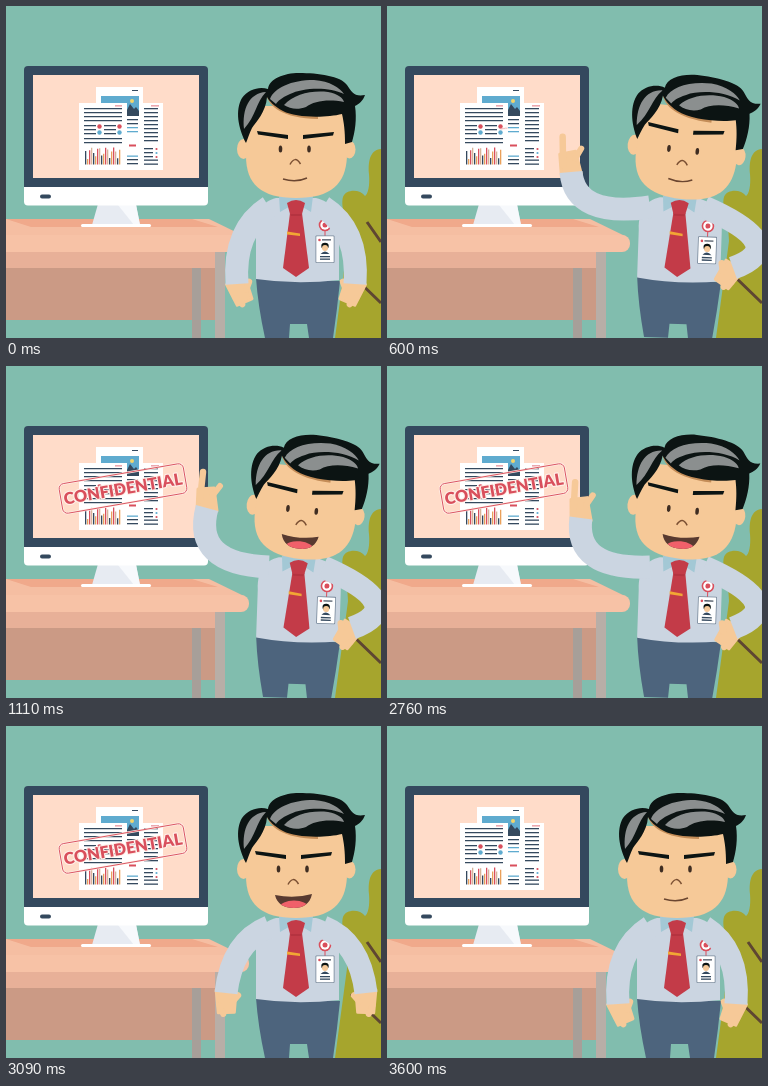
An HTML page with a canvas for the animation above (4500 ms loop, 375 by 332 pixels).

```html
<!DOCTYPE html>
<html lang="en">
<head>
<meta charset="utf-8">
<title>Confidential</title>
<style>
html, body { margin: 0; width: 100%; height: 100%; overflow: hidden; background: #81bdae; }
canvas { display: block; }
</style>
</head>
<body>
<canvas id="stage" width="375" height="332"></canvas>
<script>
const ctx = document.getElementById('stage').getContext('2d');
const LOOP = 4500;
const NAVY = '#34495e', RED = '#d94f5c', BLUE = '#5fabcf', SKIN = '#f6c998';
const SHIRT = '#cbd5e1', HAIR = '#0c1413', GRAY = '#8b8f8f', WHITE = '#ffffff';

// Drawing helpers
function fill(color, d) { ctx.fillStyle = color; ctx.fill(new Path2D(d)); }
function line(color, width, d) {
  ctx.strokeStyle = color;
  ctx.lineWidth = width;
  ctx.stroke(new Path2D(d));
}
function rect(color, x, y, w, h, r = 0) {
  ctx.fillStyle = color;
  ctx.beginPath();
  ctx.roundRect(x, y, w, h, r);
  ctx.fill();
}
function oval(color, x, y, rx, ry = rx) {
  ctx.fillStyle = color;
  ctx.beginPath();
  ctx.ellipse(x, y, rx, ry, 0, 0, Math.PI * 2);
  ctx.fill();
}
function rows(color, x, y, w, count = 1, gap = 4, h = 1.3) {
  for (let i = 0; i < count; i++) rect(color, x, y + i * gap, w, h);
}
function group(draw) { ctx.save(); draw(); ctx.restore(); }
function turn(degrees, x, y) {
  ctx.translate(x, y);
  ctx.rotate(degrees * Math.PI / 180);
  ctx.translate(-x, -y);
}

// Eased value between timed keys; values may be nested lists
const mix = (a, b, k) => Array.isArray(a) ? a.map((v, i) => mix(v, b[i], k)) : a + (b - a) * k;
function track(keys, t) {
  const next = keys.findIndex(([time]) => time > t);
  if (next === 0) return keys[0][1];
  if (next < 0) return keys[keys.length - 1][1];
  const [t0, a] = keys[next - 1], [t1, b] = keys[next];
  const k = (t - t0) / (t1 - t0);
  return mix(a, b, k * k * (3 - 2 * k));
}

// Arm pose: elbow control point, wrist, hand angle, finger extension
const hang = [[227, 224], [231, 278], -200, 0];
const swing = [[226, 216], [220, 267], -178, 0];
const reach = [[188, 212], [184, 166], -7, 1];
const point = [[186, 198], [201, 142], 0, 1];
const hip = [[174, 240], [234, 262], -212, 0];

const pointingArm = [[330, hang], [600, reach], [870, point], [2730, point], [2800, reach], [3090, swing], [3600, hang]];
const hipArm = [[330, hang], [600, hip], [2730, hip], [3090, swing], [3600, hang]];
const lean = [[330, 0], [600, 1], [2730, 1], [3090, 0]];
const glance = [[330, 0], [600, 1], [3090, 1], [3600, 0]];
const speech = [[630, 0], [840, 1], [3120, 1], [3420, 0]];
const stampSize = [[560, 0], [855, 1.086], [1110, 1], [3090, 1], [3285, 1.086], [3590, 0]];

function drawRoom() {
  rect('#81bdae', 0, 0, 375, 332);
  fill('#a6a52d', 'M375 143C364 144 362 155 363 168C364 180 362 188 359 190C354 183 340 183 337 191C334 202 342 215 342 235L329 332H375Z');
  line('#5e4632', 3, 'M361 216L375 236M345 268L375 297');
  rect('#cb9a85', 0, 261, 209, 53);
  rect('#a79f99', 186, 261, 9, 71);
  rect('#e8b098', 0, 246, 209, 16);
  rect('#b8aea7', 209, 246, 10, 86);
  fill('#f5bea2', 'M0 213H203L238 230H0Z');
  fill('#f0a98b', 'M0 213H186L212 221H25Z');
  rect('#f7c2a6', -10, 229, 253, 17, 8);
}

function drawMonitor() {
  fill('#e7ebf2', 'M92 198H130L134 219H86Z');
  fill('#f7f9fc', 'M112 199H130L134 219H128Z');
  rect(WHITE, 75, 218, 70, 3, 1.5);
  rect(WHITE, 18, 150, 184, 49.5, 4);
  rect(NAVY, 18, 60, 184, 121, [4, 4, 0, 0]);
  rect('#ffdcc9', 27, 69, 166, 103);
  rect(NAVY, 34, 188.5, 11, 4, 2);
}

function drawPapers() {
  // Right sheet
  rect(WHITE, 110, 97, 47, 67);
  rows(RED, 145, 99.5, 8, 1, 1, 0.8);
  rows(NAVY, 138, 102, 14, 9);
  rows(NAVY, 138, 142, 9, 3);
  for (let i = 0; i < 3; i++) oval(i % 2 ? BLUE : RED, 150.5, 143 + i * 4, 1.1);
  rows(NAVY, 138, 153.5, 14, 2);

  // Back sheet with the picture
  rect(WHITE, 90, 81, 47, 83);
  rows(NAVY, 126, 84, 6, 1, 1, 1);
  rect(BLUE, 95, 90, 38, 20);
  fill(NAVY, 'M118 110L124 98L128 103L130 101L133 105V110Z');
  oval('#f3d56a', 126, 95, 2);
  rows(NAVY, 121, 113, 11, 2);
  rows(BLUE, 121, 121, 11, 2);
  rect(RED, 123, 138.5, 7, 2);
  rows(BLUE, 121, 149.5, 11);
  rows(NAVY, 121, 153, 11, 2);

  // Front sheet
  rect(WHITE, 73, 97, 48, 67);
  rows(RED, 109, 99.5, 7, 1, 1, 0.8);
  rows(NAVY, 78, 102, 38, 4);
  for (const x of [78, 98]) {
    rows(NAVY, x, 119, 12, 3);
    oval(RED, x + 15.5, 120.5, 2.2);
    oval(BLUE, x + 15.5, 126.5, 2.2);
  }
  rows(NAVY, 78, 132, 38, 2);
  const barColors = [NAVY, '#e9a15c', RED, '#d7b59b'];
  for (let i = 0; i < 18; i++) {
    const h = 5 + 12 * Math.abs(Math.sin(i * 2.3 + 0.8));
    rect(barColors[i % 4], 79 + i * 2, 158.5 - h, 1.3, h);
  }
}

function drawStamp(scale) {
  if (scale <= 0) return;
  group(() => {
    ctx.translate(117, 122.5);
    ctx.rotate(-9.8 * Math.PI / 180);
    ctx.scale(scale, scale);
    ctx.lineJoin = 'round';
    ctx.beginPath();
    ctx.roundRect(-63, -15, 126, 30, 5);
    for (const [color, width] of [['#fff0ea', 2.4], [RED, 0.9]]) {
      ctx.strokeStyle = color;
      ctx.lineWidth = width;
      ctx.stroke();
    }
    ctx.font = '900 16.3px Lato, sans-serif';
    ctx.textAlign = 'center';
    ctx.lineWidth = 2.2;
    ctx.strokeStyle = '#fff0ea';
    ctx.strokeText('CONFIDENTIAL', 0, 6);
    ctx.fillStyle = RED;
    ctx.fillText('CONFIDENTIAL', 0, 6);
  });
}

function drawBadge() {
  line(RED, 1, 'M319 224V231');
  oval(RED, 319, 219, 6.3);
  oval(WHITE, 319, 219, 4.7);
  oval(RED, 319, 219, 2.5);
  rect('#78889a', 309.5, 229.5, 19, 27.5, 1);
  rect(WHITE, 310.3, 230.3, 17.4, 25.9, 0.5);
  oval(RED, 313.5, 234, 1.3);
  rows('#4b5563', 316, 233.2, 9);
  oval(HAIR, 319, 240, 3.7, 3.2);
  oval(SKIN, 319, 242, 3);
  fill(NAVY, 'M314.5 248Q319 243 323.5 248Z');
  rows(NAVY, 314, 250, 10, 2, 2.5);
}

function drawTorso() {
  fill('#4d647d', 'M250 272L334 275Q331 305 327 332H303L301 318H284L283 332H259Q252 300 250 272Z');
  fill(SHIRT, 'M270 192H310C325 196 334 205 333 225V274Q290 279 250 273V225C249 205 256 196 270 192Z');
  fill('#a3c8d5', 'M273 190H307L305 206L290 197L274 206Z');
  fill('#c33b48', 'M284 207H296L303 262L290 271L277 262Z');
  fill('#b53340', 'M284 207H296L295 210H285Z');
  fill('#c33b48', 'M281 197Q290 191 299 197L296 208H284Z');
  fill('#f2a634', 'M281 225.5L294 227.5V230L281 228.5Z');
  drawBadge();
}

// Left-hand side arm; the other one is its mirror image
function drawArm([elbow, wrist, angle, extension]) {
  group(() => {
    ctx.translate(...wrist);
    ctx.rotate(angle * Math.PI / 180);
    ctx.lineJoin = ctx.lineCap = 'round';
    const palm = 'M-10 3L-9 -19L7 -20L10 3Z';
    fill(SKIN, palm);
    line(SKIN, 3, palm);
    line(SKIN, 6.5, `M-7 -8L${mix([-12, -2], [-4, -36], extension)}`);
    line(SKIN, 6, `M6 -13L${mix([2, -21], [13, -22], extension)}`);
  });
  line(SHIRT, 23, `M263 201Q${elbow} ${wrist}`);
}

function drawMouth(open) {
  if (open < 0.08) {
    line('#6b4630', 1.4, 'M277 173Q290 177 301 172');
    return;
  }
  group(() => {
    ctx.translate(289, 170);
    ctx.scale(mix(0.7, 1, open), open);
    ctx.translate(-289, -170);
    const lips = 'M271 169Q290 173 308 168C306 178 299 182 290 182C280 182 273 178 271 169Z';
    fill('#583a30', lips);
    ctx.clip(new Path2D(lips));
    oval('#f0606a', 290, 181, 14, 6.5);
  });
}

function drawHead(look, lift, open) {
  oval(SKIN, 237.5, 143, 6.5, 10);
  oval(SKIN, 343.5, 143.5, 6, 9);
  fill(SKIN, 'M243 100L240 150C240 178 255 192 290 192C325 192 340 178 341 150L342 100Z');
  fill('#c48d58', 'M260 88C263 101 276 112 312 113V104Z');
  fill(HAIR, 'M240 137C232 122 229 104 236 92C242 83 254 80 262 83C263 73 278 67 293 67C312 67 335 70 341 79C346 86 348 91 359 89C357 95 353 98 349 100C351 113 349 126 346 136L339 138C339 125 338 117 336 108C320 112 290 112 277 105C268 100 263 95 261 91C260 106 250 116 246 122C243 128 242 132 240 137Z');
  fill(GRAY, 'M238 123C236 103 243 87 260 86C250 96 250 110 238 123Z');
  fill(GRAY, 'M264 93C268 82 285 74 308 74C324 75 334 82 338 88C322 80 296 82 284 88C275 92 272 95 270 98Z');
  fill(GRAY, 'M278 99C288 88 306 84 322 86C332 88 337 92 338 96C322 93 308 95 300 101C292 104 284 103 278 99Z');
  ctx.translate(-2 * look, 0);
  fill(HAIR, `M251 ${125 - lift}l31 4v4l-30 -4.5z`);
  fill(HAIR, `M328 ${126 - lift}l-31 3v4l30 -3.5z`);
  oval('#3f2d22', 274.5, 143, 1.8, 3.5);
  oval('#3f2d22', 303, 143, 1.8, 3.5);
  line('#7a4f32', 1.5, 'M284 158.5Q289 149 294.5 158');
  drawMouth(open);
}

function draw(t) {
  const tilt = track(lean, t);
  drawRoom();
  drawMonitor();
  drawPapers();
  drawStamp(track(stampSize, t));
  group(() => { turn(2 * tilt, 290, 275); drawTorso(); });
  group(() => {
    ctx.translate(580, 0);
    ctx.scale(-1, 1);
    drawArm(track(hipArm, t));
  });
  drawArm(track(pointingArm, t));
  group(() => {
    turn(6 * tilt, 283, 233);
    drawHead(track(glance, t), 6 * tilt, track(speech, t));
  });
}

const start = performance.now();
function tick() {
  draw((performance.now() - start) % LOOP);
  requestAnimationFrame(tick);
}
tick();
</script>
</body>
</html>
```
